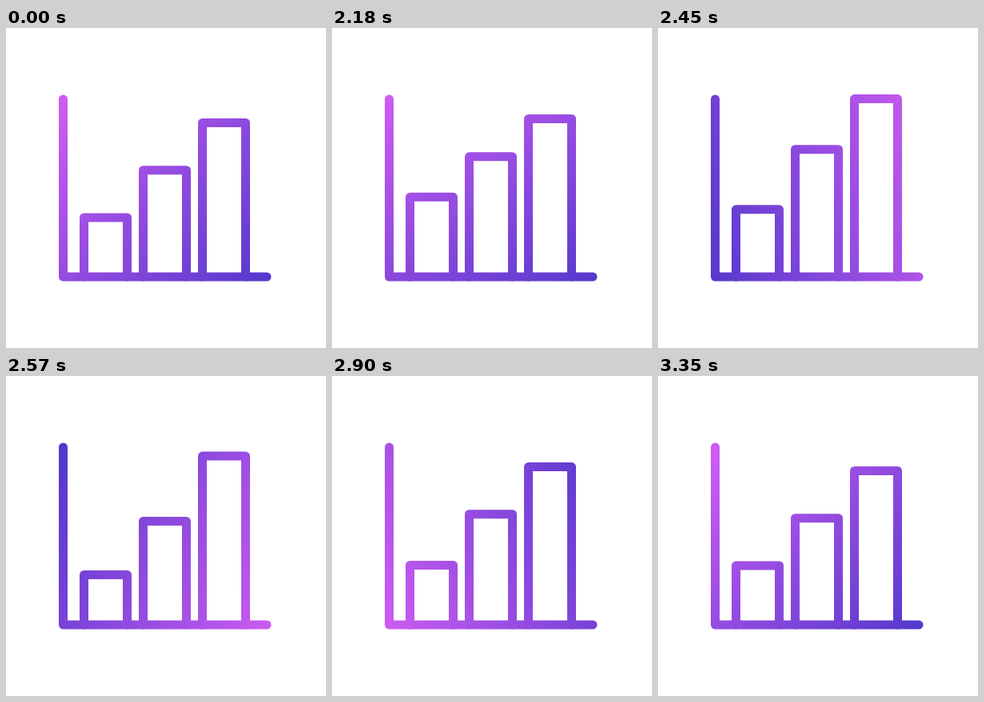
Recreate the animation shown at these times as an HTML page. Size 400 px wide and 400 px high, loop 3.47 s.

```html
<!DOCTYPE html>
<html lang="en">
<head>
<meta charset="utf-8">
<title>Bar chart icon</title>
<style>
  html, body { margin: 0; height: 100%; overflow: hidden; background: #fff; }
  svg { display: block; width: 100vw; height: 100vh; }
</style>
</head>
<body>
<svg viewBox="0 0 400 400">
  <linearGradient id="ink" gradientUnits="userSpaceOnUse" x1="33" y1="205" x2="373" y2="205">
    <stop stop-color="#cc5cf2"/>
    <stop offset="1" stop-color="#5438cc"/>
  </linearGradient>
  <g fill="none" stroke="url(#ink)" stroke-width="11" stroke-linecap="round" stroke-linejoin="round">
    <path d="M71.5 89V311H326"/>
    <path class="bar"/>
    <path class="bar"/>
    <path class="bar"/>
  </g>
</svg>
<script>
const LOOP = 3470, STEP = 30, START = 2000, LAST_STEP = 45;
const BASE = 311, BAR_WIDTH = 54, STAGGER = 2.5;
const PEAK = 9.2, LAND = 15.9, LIFT = 30;
const SPIN_FROM = 5, SPIN_TO = 36;

const gradient = document.getElementById('ink');
const bars = [...document.querySelectorAll('.bar')];
const clamp01 = v => Math.min(1, Math.max(0, v));

// Extra bar height: rise, fall, then a damped swing around rest.
function lift(s) {
  if (s <= 0) return 0;
  if (s < PEAK) return LIFT * Math.sin(Math.PI / 2 * s / PEAK);
  if (s < LAND) return LIFT * (1 - ((s - PEAK) / (LAND - PEAK)) ** 2.87);
  const u = s - LAND;
  return -15.7 * Math.sin(Math.PI * u / 7.2) * Math.exp(-0.093 * u);
}

function draw(time) {
  let step = Math.floor((time % LOOP - START) / STEP);
  if (step < 0 || step >= LAST_STEP) step = 0;

  const angle = 45 + 360 * clamp01((step - SPIN_FROM) / (SPIN_TO - SPIN_FROM));
  gradient.setAttribute('gradientTransform', `rotate(${angle} 203 205)`);

  bars.forEach((bar, i) => {
    const x = 97.5 + 74 * i;
    const top = 237 - 59.25 * i - lift(step - STAGGER * i);
    bar.setAttribute('d', `M${x} ${BASE}V${top}h${BAR_WIDTH}V${BASE}`);
  });
}

function tick() {
  draw(performance.now());
  requestAnimationFrame(tick);
}
tick();
</script>
</body>
</html>
```
